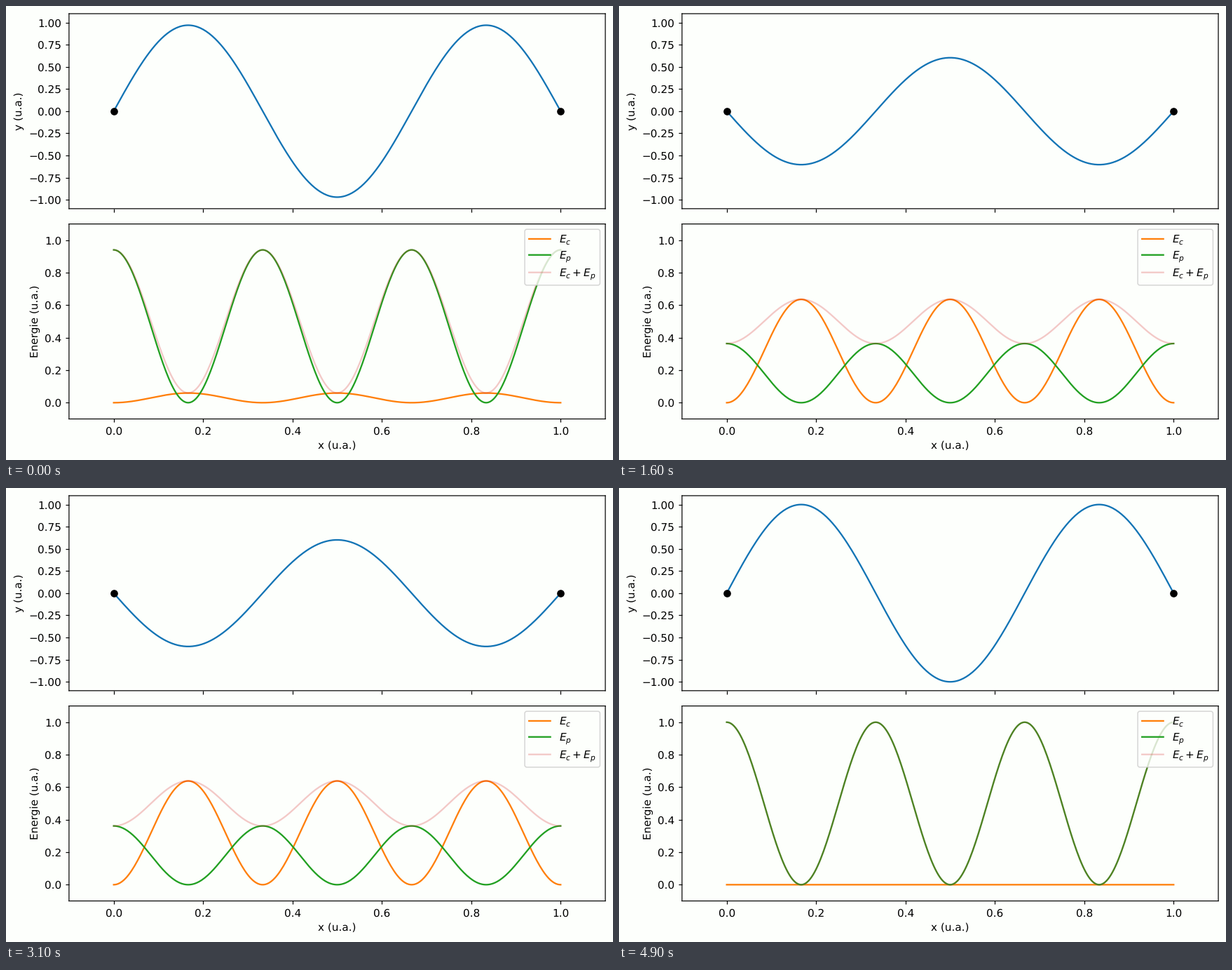
Recreate the animation shown at these times as a matplotlib script. Size 866 px wide and 647 px high, loop 5 s.

```python
import numpy as np
import matplotlib.pyplot as plt
from matplotlib.animation import FuncAnimation

WIDTH, HEIGHT = 866, 647
DPI = WIDTH / 7.9     # the stage is 7.9 inches wide
FRAMES, INTERVAL = 50, 100
MODE = 3              # number of half waves on the string
PHASE_STEP = 0.12325  # radians per frame
PAPER = "#fdfffc"
BLUE, ORANGE, GREEN, RED = "#1274b5", "#ff7f0a", "#22a022", "#d62728"

# Panel edges in pixels from the top left corner.
LEFT, RIGHT = 89.9, WIDTH - 0.1 * DPI
TOP, BOTTOM = 0.1 * DPI, 588.5
GAP = 14.3 / 72 * DPI
PANEL_HEIGHT = (BOTTOM - TOP - GAP) / 2

plt.rcParams.update({
    "font.family": "DejaVu Sans",
    "font.size": 10,
    "text.hinting": "none",
    "path.snap": False,
    "figure.facecolor": PAPER,
    "axes.facecolor": PAPER,
    "savefig.facecolor": PAPER,
})

# The tiny offset keeps the pixel size from rounding down.
fig = plt.figure(figsize=((WIDTH + 1e-6) / DPI, (HEIGHT + 1e-6) / DPI), dpi=DPI)


def add_panel(top, **kwargs):
    return fig.add_axes([LEFT / WIDTH, 1 - (top + PANEL_HEIGHT) / HEIGHT,
                         (RIGHT - LEFT) / WIDTH, PANEL_HEIGHT / HEIGHT], **kwargs)


string_ax = add_panel(TOP)
energy_ax = add_panel(BOTTOM - PANEL_HEIGHT, sharex=string_ax)

x = np.linspace(0, 1, 301)
shape = np.sin(MODE * np.pi * x)
slope = np.cos(MODE * np.pi * x)

string_line, = string_ax.plot(x, shape, color=BLUE)
string_ax.plot([0, 1], [0, 0], "o", color="black")
string_ax.set(xlim=(-0.1, 1.1), ylim=(-1.1, 1.1), ylabel="y (u.a.)")
string_ax.set_yticks(np.linspace(-1, 1, 9))
string_ax.tick_params(labelbottom=False)

kinetic_line, = energy_ax.plot(x, 0 * x, color=ORANGE, label="$E_c$")
potential_line, = energy_ax.plot(x, 0 * x, color=GREEN, label="$E_p$")
total_line, = energy_ax.plot(x, 0 * x, color=RED, alpha=0.25, label="$E_c+E_p$")
energy_ax.set(ylim=(-0.1, 1.1), xlabel="x (u.a.)", ylabel="Energie (u.a.)")
energy_ax.set_yticks(np.linspace(0, 1, 6))
energy_ax.legend(loc="upper right", labelspacing=0.34)


def update(frame):
    phase = PHASE_STEP * (frame + 2)
    kinetic = (shape * np.sin(phase)) ** 2
    potential = (slope * np.cos(phase)) ** 2
    string_line.set_ydata(shape * np.cos(phase))
    kinetic_line.set_ydata(kinetic)
    potential_line.set_ydata(potential)
    total_line.set_ydata(kinetic + potential)
    return string_line, kinetic_line, potential_line, total_line


animation = FuncAnimation(fig, update, frames=FRAMES, interval=INTERVAL,
                          repeat=True, repeat_delay=0)
plt.show()
```
